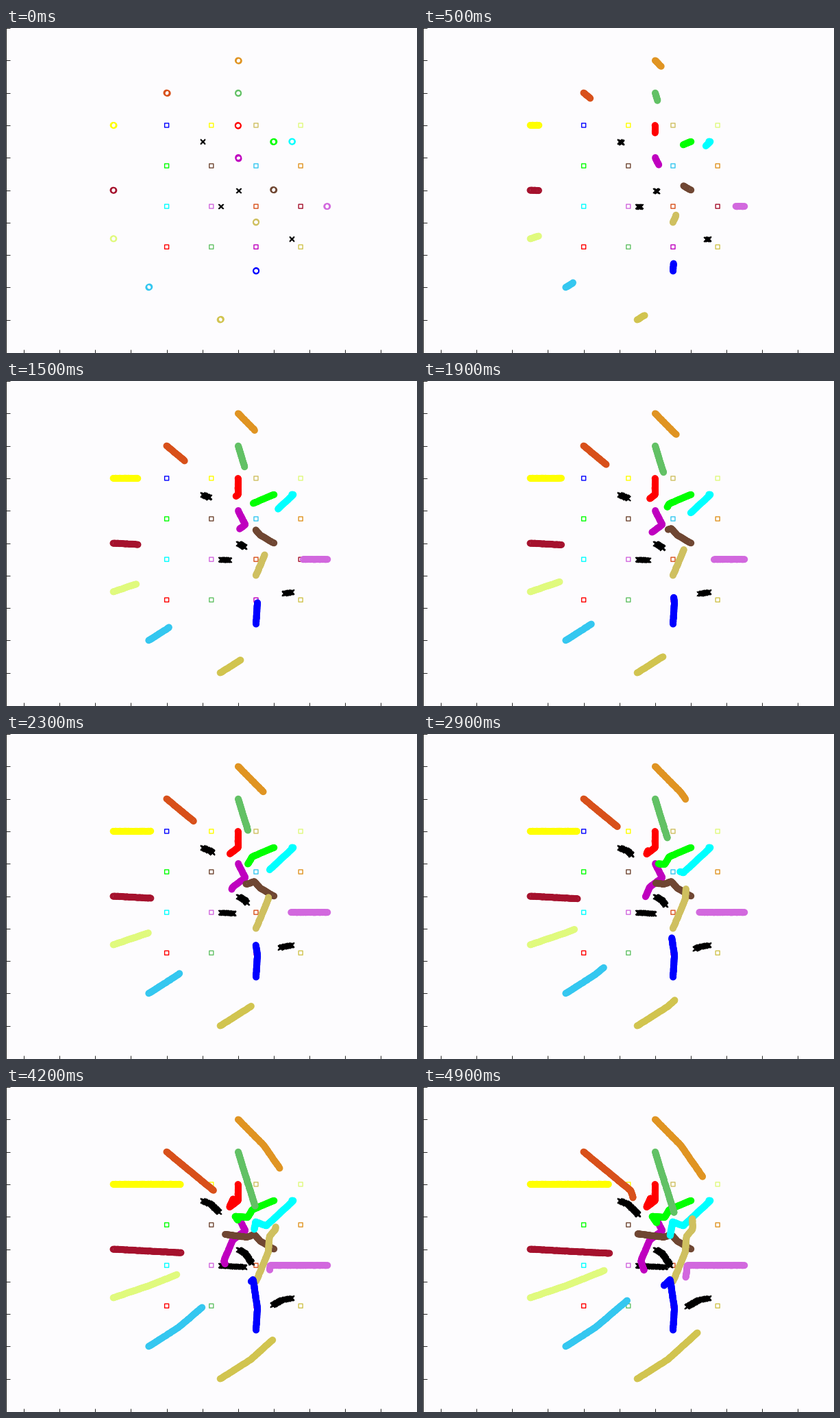
Recreate the animation shown at these times as a matplotlib script. Size 600x474 px, loop 5 s.

```python
import numpy as np
import matplotlib.pyplot as plt
from matplotlib.animation import FuncAnimation

W, H, DPI = 600, 474, 64
PX = 72 / DPI  # points per pixel
FRAMES, INTERVAL = 50, 100
STEPS = 2 * FRAMES  # two marks are left per frame
CRUISE = 2.22  # distance covered in one loop at full speed
UNIT_X, UNIT_Y = 52.15, 47.3  # pixels per axis unit
LEFT, BOTTOM = 26, 48.3  # pixel offset of the axis origin

# Each rover's way points, in the order of the goals of the same colour
routes = {
    "#0000ff": [(6.5, 1.5), (6.54, 2.17), (6.42, 3.06), (6.25, 2.88)],
    "#ffff00": [(2.5, 6), (4.69, 6)],
    "#cfc060": [(6.5, 3), (6.84, 3.9), (6.88, 4.4), (7.05, 4.62), (7.04, 4.94)],
    "#e0fa7d": [(2.5, 2.5), (3.5, 2.87), (4.57, 3.34)],
    "#00ff00": [(7, 5.5), (6.4, 5.22), (6.27, 4.98), (5.92, 5.01), (6.04, 4.82)],
    "#6f4632": [(7, 4), (6.62, 4.25), (6.45, 4.45), (6.25, 4.37), (5.52, 4.47)],
    "#34c7f0": [(3.5, 1), (4.36, 1.61), (5.22, 2.42)],
    "#e09422": [(6, 8), (6.72, 7.2), (7.33, 6.23)],
    "#00ffff": [(7.5, 5.5), (7.55, 5.5), (6.79, 4.72), (6.49, 4.84), (6.42, 4.42)],
    "#d268de": [(8.5, 3.5), (6.9, 3.5), (6.86, 3.14)],
    "#d8501a": [(4, 7), (5.32, 5.8), (5.38, 5.59)],
    "#a5112d": [(2.5, 4), (4.72, 3.87)],
    "#ff0000": [(6, 6), (6, 5.5), (5.76, 5.3), (5.87, 5.56)],
    "#62c165": [(6, 7), (6.36, 5.73), (6.53, 5.13)],
    "#bf00bf": [(6, 5), (6.2, 4.57), (5.85, 4.28), (5.6, 3.64), (5.69, 3.35)],
    "#d1c44f": [(5.5, 0), (6.36, 0.6), (7.18, 1.42)],
}
obstacles = [
    [(5, 5.5), (5.23, 5.4), (5.52, 5.07)],
    [(6, 4), (6.2, 3.87), (6.42, 3.5)],
    [(5.5, 3.5), (6.29, 3.45)],
    [(7.5, 2.5), (7.2, 2.43), (6.88, 2.23)],
]

rng = np.random.default_rng(7)


def travel(points, jitter, cruise=None):
    """Positions along a polyline; a rover on a short route slows down."""
    x, y = np.transpose(points)
    along = np.r_[0, np.cumsum(np.hypot(np.diff(x), np.diff(y)))]
    length = along[-1]
    power = cruise / length if cruise else 1
    u = np.linspace(0, 1, STEPS)
    done = length * (1 - (1 - u) ** power)
    path = np.column_stack([np.interp(done, along, x), np.interp(done, along, y)])
    return path + rng.uniform(-jitter, jitter, path.shape)


colors = list(routes)
rings = np.stack([travel(p, 0.006, CRUISE) for p in routes.values()], axis=1)
crosses = np.stack([travel(p, 0.011) for p in obstacles], axis=1)

fig = plt.figure(figsize=(W / DPI, H / DPI), dpi=DPI, facecolor="#fdfcfe")
ax = fig.add_axes([0, 0, 1, 1], facecolor="none")
ax.spines[["top", "right"]].set_visible(False)
ax.spines[["left", "bottom"]].set(linewidth=PX, color="#262626")
ax.tick_params(direction="in", length=5.5 * PX, width=PX, color="#262626",
               labelleft=False, labelbottom=False)
ax.set(xticks=range(11), yticks=range(10),
       xlim=(-LEFT / UNIT_X, (W - LEFT) / UNIT_X),
       ylim=(-BOTTOM / UNIT_Y, (H - BOTTOM) / UNIT_Y))

goal_x, goal_y = np.meshgrid(4 + 1.25 * np.arange(4), 6 - 1.25 * np.arange(4))
ax.scatter(goal_x, goal_y, s=(6 * PX) ** 2, marker="s", facecolors="none",
           edgecolors=colors, linewidths=1.4 * PX, snap=False)

marks = []
for ring, cross in zip(rings, crosses):
    marks.append((
        ax.scatter(*ring.T, s=(8 * PX) ** 2, facecolors="none",
                   edgecolors=colors, linewidths=1.8 * PX),
        ax.scatter(*cross.T, s=(6.8 * PX) ** 2, marker="x", c="black",
                   linewidths=1.5 * PX),
    ))


def update(frame):
    for step, pair in enumerate(marks):
        for mark in pair:
            mark.set_visible(step <= 2 * frame + 1)
    return []


anim = FuncAnimation(fig, update, frames=FRAMES, interval=INTERVAL,
                     repeat=True, repeat_delay=0, blit=False)
plt.show()
```
